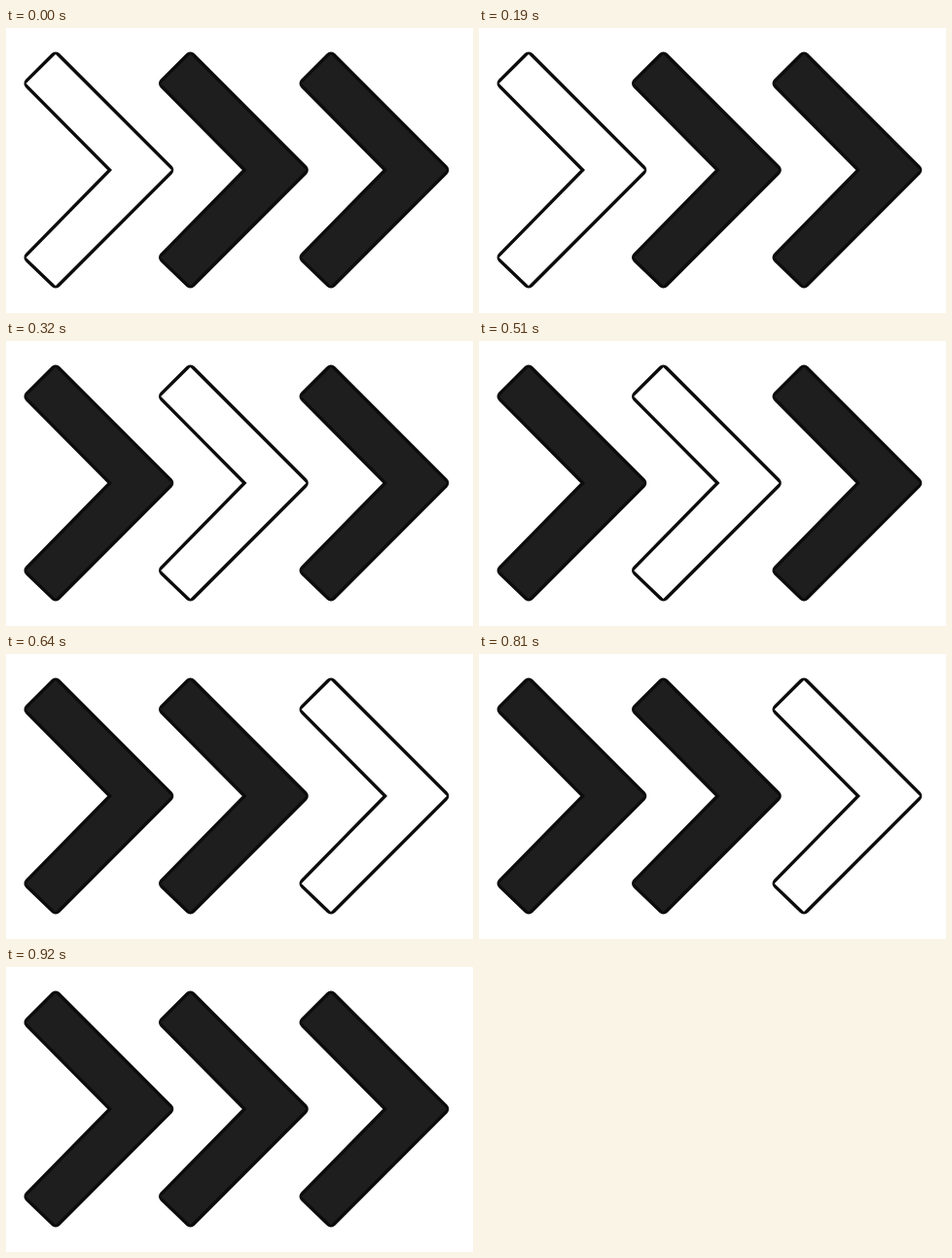
Write an HTML page that moves like this. It is 480 px wide and 293 px high and loops after 1.2 s.

```html
<!DOCTYPE html>
<html lang="en">
<head>
<meta charset="utf-8">
<title>Chevrons</title>
<style>
  html, body { margin: 0; width: 100%; height: 100%; overflow: hidden; background: #fff; }
  svg { display: block; width: 100vw; height: 100vh; }
  use { fill: #1e1e1e; }
  use.lit { fill: #fff; }
  .edge { fill: #0c0c0c; stroke: #0c0c0c; stroke-width: 12; stroke-linejoin: round; }
</style>
</head>
<body>
<svg viewBox="0 0 480 293">
  <defs>
    <g id="chevron">
      <path class="edge" d="M51 30.5 L166.3 146 L51 261.5 L24.5 236 L112.7 146 L24.5 57 Z"/>
      <path d="M51 27 L170 146 L51 265 L20.7 236 L109 146 L20.7 57 Z"/>
    </g>
  </defs>
  <use href="#chevron"/>
  <use href="#chevron" x="138.5"/>
  <use href="#chevron" x="283"/>
</svg>
<script>
  const LOOP = 1200;
  const ends = [320, 640, 920]; // when each chevron stops being lit
  const chevrons = document.querySelectorAll('use');
  const start = performance.now();

  function draw(now) {
    const t = Math.max(0, now - start) % LOOP;
    const lit = ends.findIndex(end => t < end);
    chevrons.forEach((chevron, i) => chevron.classList.toggle('lit', i === lit));
    requestAnimationFrame(draw);
  }
  draw(start);
</script>
</body>
</html>
```
